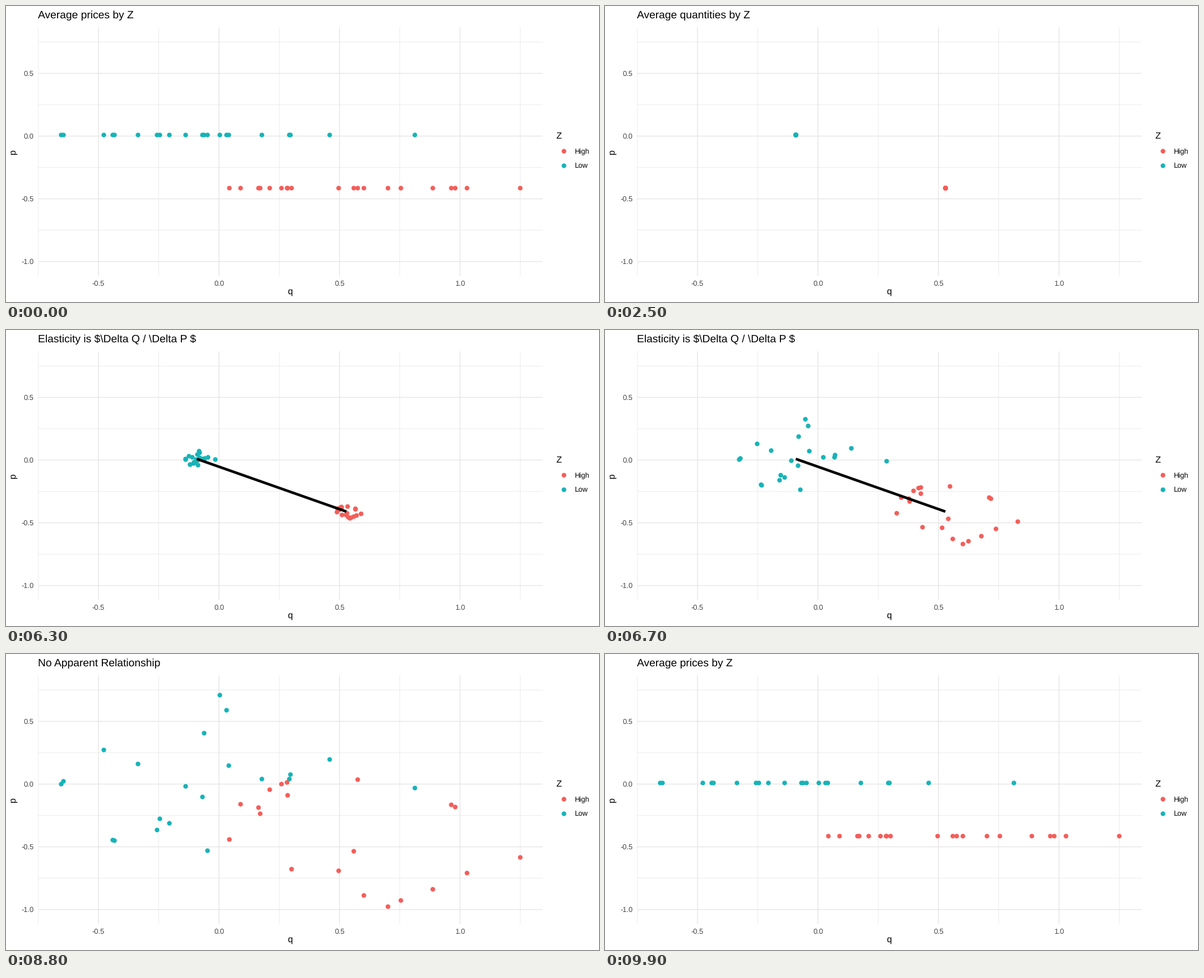
Animation of 1058x529 px, one loop 10000 ms. Source, as a matplotlib script:

```python
import matplotlib.pyplot as plt
import numpy as np
from matplotlib.animation import FuncAnimation

W, H, DPI = 1058, 529, 64
PX = 72 / DPI  # points per pixel
LEFT, RIGHT, TOP, BOTTOM = 57, 957.7, 38.2, 482.3
RED, TEAL = "#F35E5A", "#17B3B7"
GRID, TICK = "#E8E8E8", "#444444"
RADIUS = 4.17

plt.rcParams.update({
    "font.family": "Liberation Sans",
    "text.hinting": "none",
    "text.parse_math": False,
    "path.snap": False,
})

# Pixel positions; heights are taken at 11/12 of the full spread.
LOW = np.array([
    (98, 231.5), (101.5, 227), (173.5, 171), (189.5, 331.5), (193, 333),
    (234.5, 195.5), (269, 313.5), (274, 294), (290.5, 302), (319.5, 236),
    (350, 255), (352.5, 141), (359, 350.5), (381, 72.5), (392.5, 100),
    (396.5, 199), (456, 223), (504.5, 223), (506.5, 214.5), (577, 188),
    (728.5, 239)])
HIGH = np.array([
    (397.5, 331), (417.5, 267.5), (450, 273.5), (452.5, 284.5), (470, 242),
    (490.5, 232), (501, 229), (501.5, 252), (509, 384), (593, 386.5),
    (619.5, 352), (626.5, 223.5), (638, 430.5), (681, 451), (704, 440),
    (761, 420), (793.5, 268.5), (801, 272.5), (822, 390.5), (917, 362.5)])
LOW_MEAN = np.array((340.4, 230.4))
HIGH_MEAN = np.array((607.3, 324.5))

TITLES = [
    "Average prices by Z",
    "Average quantities by Z",
    r"Elasticity is $\Delta Q / \Delta P $",
    "No Apparent Relationship",
    "Average prices by Z",
]
TITLE_STARTS = [20, 45, 69, 94]

fig = plt.figure(figsize=(W / DPI, H / DPI), dpi=DPI, facecolor="white")
ax = fig.add_axes([0, 0, 1, 1])
ax.set_xlim(0, W)
ax.set_ylim(H, 0)
ax.axis("off")


def x_px(q):
    return 380 + 430 * q


def y_px(p):
    return 232.5 - 224.2 * p


def label(x, y, text, size, color="black", **kw):
    return ax.text(x, y, text, fontsize=size * PX, color=color,
                   va="baseline", **kw)


def rule(xs, ys, width, color, z):
    return ax.plot(xs, ys, color=color, lw=width * PX, zorder=z,
                   solid_capstyle="butt")[0]


def dots(points, color):
    return ax.scatter(points[:, 0], points[:, 1], s=(2 * RADIUS * PX) ** 2,
                      c=color, linewidths=0, zorder=3)


def draw_grid():
    for q in (-0.75, -0.25, 0.25, 0.75, 1.25):
        rule([x_px(q)] * 2, [TOP, BOTTOM], 0.8, GRID, 1)
    for p in (-0.75, -0.25, 0.25, 0.75):
        rule([LEFT, RIGHT], [y_px(p)] * 2, 0.8, GRID, 1)
    for q in (-0.5, 0, 0.5, 1):
        rule([x_px(q)] * 2, [TOP, BOTTOM], 1.57, GRID, 2)
        label(x_px(q), 499.6, f"{q:.1f}", 12.87, TICK, ha="center")
    for p in (-1, -0.5, 0, 0.5):
        rule([LEFT, RIGHT], [y_px(p)] * 2, 1.57, GRID, 2)
        label(49.5, y_px(p) + 4.6, f"{p:.1f}", 12.87, TICK, ha="right")
    label(507.3, 515, "q", 16.1, ha="center")
    ax.text(16.3, 260.4, "p", fontsize=16.1 * PX, rotation=90,
            rotation_mode="anchor", ha="center", va="baseline")


def draw_legend():
    label(981, 237.2, "Z", 16.1)
    for y, name, color in ((259.2, "High", RED), (284.8, "Low", TEAL)):
        dots(np.array([(994.5, y)]), color)
        label(1015, y + 4.6, name, 12.87)


draw_grid()
draw_legend()
title = label(LEFT, 22.3, TITLES[0], 19.3)
low_dots = dots(LOW, TEAL)
high_dots = dots(HIGH, RED)
slope = rule(*zip(LOW_MEAN, HIGH_MEAN), 4.7, "black", 4)


def update(i):
    sx = np.interp(i, [12, 25, 62, 74], [1, 0, 0, 1])
    sy = np.interp(i, [62, 74, 87, 99], [0, 1, 1, 0])
    spread = np.array((sx, sy * 12 / 11))
    low_dots.set_offsets(LOW_MEAN + (LOW - LOW_MEAN) * spread)
    high_dots.set_offsets(HIGH_MEAN + (HIGH - HIGH_MEAN) * spread)
    title.set_text(TITLES[sum(i >= start for start in TITLE_STARTS)])
    slope.set_visible(50 <= i < 88)
    return low_dots, high_dots, title, slope


anim = FuncAnimation(fig, update, frames=100, interval=100, repeat=True,
                     repeat_delay=0, blit=False)
plt.show()
```
